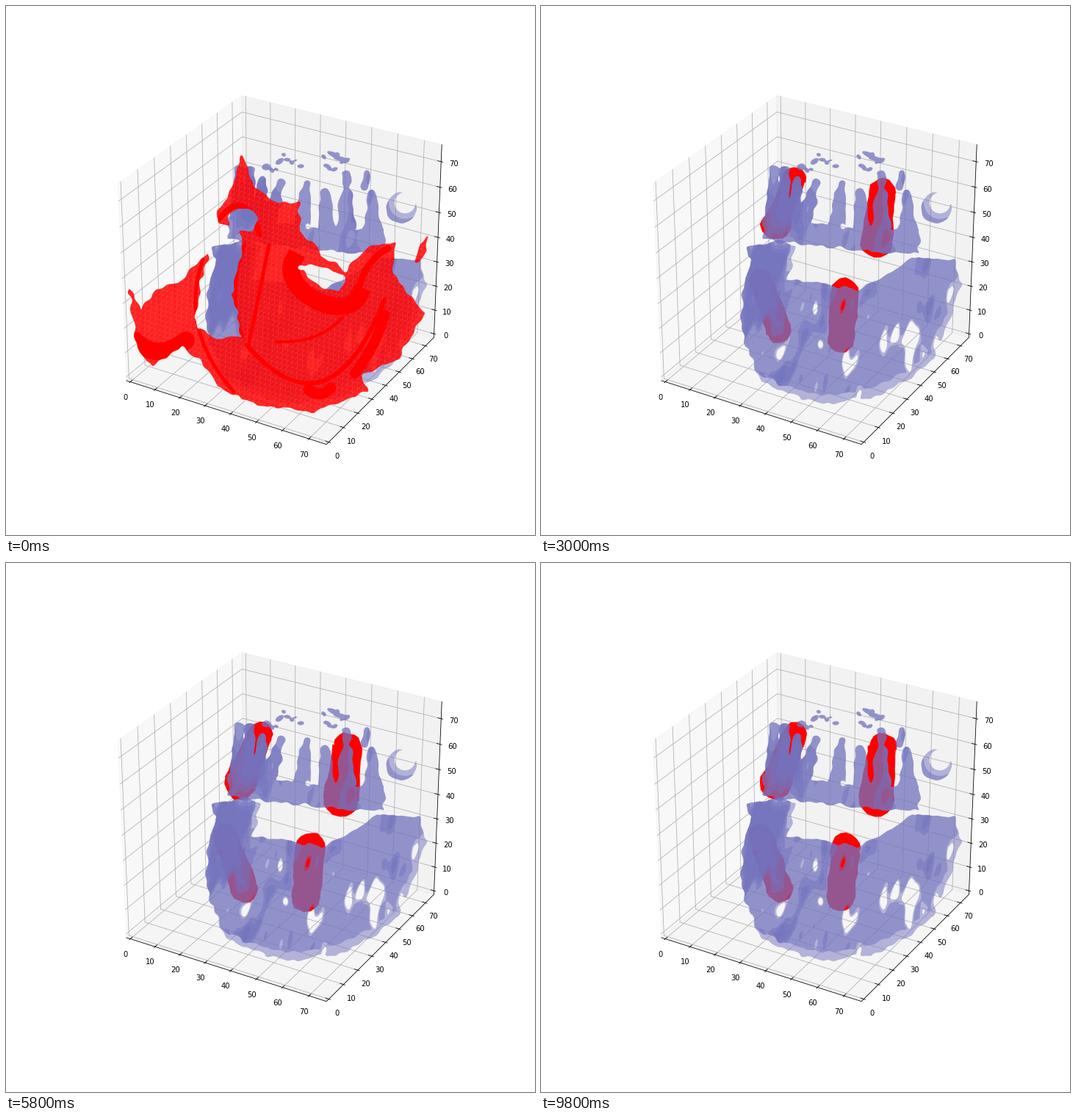
A matplotlib script that plays this animation: 720 px wide and 720 px high, repeating every 10 s.

```python
import numpy as np
import matplotlib.pyplot as plt
from matplotlib.animation import FuncAnimation
from matplotlib.collections import LineCollection
from matplotlib.patches import PathPatch
from matplotlib.path import Path

SIZE, TOP, FRAMES = 720, 75, 50
BLUE, RED = (0.45, 0.45, 0.75), (1, 0, 0)
rng = np.random.default_rng(5)

fig = plt.figure(figsize=(10, 10), dpi=72, facecolor="white")
ax = fig.add_axes([0, 0, 1, 1])
ax.set(xlim=(0, SIZE), ylim=(SIZE, 0))
ax.axis("off")


# ---- 3D box ----
def project(p):
    """Perspective view (elev 30, azim -60) of points in the unit cube."""
    p = np.atleast_2d(p) - 0.5
    h = np.sqrt(3) / 2
    depth = 10 - p @ [h / 2, -0.75, 0.5]
    u = p @ [h, 0.5, 0] / depth
    v = p @ [-0.25, h / 2, h] / depth
    return np.c_[90 + (u + 0.095) / 0.185 * 558,
                 630 - (v + 0.095) / 0.185 * 543.6]


LO, HI, PAD = -1 / 48, 49 / 48, 0.0418


def line(color, z, *points):
    ax.plot(*project(points).T, color=color, lw=0.8, zorder=z,
            solid_capstyle="projecting")


def pane(grey, *points):
    ax.fill(*project(points).T, color=(grey,) * 3, alpha=0.5, lw=1, zorder=0)


pane(0.95, (LO, LO, LO), (LO, HI, LO), (LO, HI, HI), (LO, LO, HI))
pane(0.90, (LO, HI, LO), (HI, HI, LO), (HI, HI, HI), (LO, HI, HI))
pane(0.925, (LO, LO, LO), (HI, LO, LO), (HI, HI, LO), (LO, HI, LO))
line("black", 1.5, (LO, LO, LO), (HI, LO, LO), (HI, HI, LO), (HI, HI, HI))

for value in range(0, TOP, 10):
    t = value / TOP
    line("#b0b0b0", 1, (t, LO, LO), (t, HI, LO), (t, HI, HI))
    line("#b0b0b0", 1, (HI, t, LO), (LO, t, LO), (LO, t, HI))
    line("#b0b0b0", 1, (LO, LO, t), (LO, HI, t), (HI, HI, t))
    out, inn = 0.1 / 12, 0.2 / 12
    line("black", 1.6, (t, LO - out, LO), (t, LO + inn, LO))
    line("black", 1.6, (HI + out, t, LO), (HI - inn, t, LO))
    line("black", 1.6, (HI + out, HI, t), (HI - inn, HI, t))
    for p in ((t, LO - PAD, LO - PAD), (HI + PAD, t, LO - PAD),
              (HI + PAD, HI + PAD, t)):
        x, y = project(p)[0]
        ax.text(x, y, str(value), ha="center", va="top", size=10, zorder=1.6)

# ---- scalar fields over the stage, positive inside a shape ----
X, Y = np.meshgrid(np.arange(150, 602, 2.0), np.arange(180, 572, 2.0))


def polygon(*points, dx=0, dy=0):
    """Signed distance to a polygon's edge."""
    p = np.array(points, float) + (dx, dy)
    best = np.full(X.shape, 1e9)
    for (ax_, ay), (bx, by) in zip(p, np.roll(p, -1, axis=0)):
        ux, uy = bx - ax_, by - ay
        t = np.clip(((X - ax_) * ux + (Y - ay) * uy) / (ux * ux + uy * uy), 0, 1)
        best = np.minimum(best, np.hypot(X - ax_ - t * ux, Y - ay - t * uy))
    inside = Path(p).contains_points(np.c_[X.ravel(), Y.ravel()])
    return np.where(inside.reshape(X.shape), best, -best)


def cone(x0, y0, r0, x1, y1, r1):
    ux, uy = x1 - x0, y1 - y0
    t = np.clip(((X - x0) * ux + (Y - y0) * uy) / (ux * ux + uy * uy), 0, 1)
    return r0 + (r1 - r0) * t - np.hypot(X - x0 - t * ux, Y - y0 - t * uy)


def ellipse(x, y, rx, ry, slope=0):
    return (1 - np.hypot((X - x) / rx, (Y - y - slope * (X - x)) / ry)) * ry


def bump(x, y, rx, ry, height):
    return height * np.exp(-((X - x) / rx) ** 2 - ((Y - y) / ry) ** 2)


def noise(across, along, lean=0.0):
    """Sum of random waves, unit spread; long axis tilted by lean."""
    c, s = np.cos(lean), np.sin(lean)
    u, v = (X * c + Y * s) / across, (Y * c - X * s) / along
    waves = rng.normal(0, 1, (40, 2))
    phase = rng.uniform(0, 2 * np.pi, 40)
    return sum(np.cos(a * u + b * v + f)
               for (a, b), f in zip(waves, phase)) / np.sqrt(20)


def outline(field, level=0.0):
    cs = ax.contourf(X, Y, field, [level, 1e6])
    path = cs.get_paths()[0]
    cs.remove()
    return path


def blob(path, color, alpha, z):
    return ax.add_patch(PathPatch(path, fc=color, alpha=alpha, lw=0, zorder=z))


def bone(shape, density, inner=None):
    """Stack of half-clear skins; negative density leaves a hole."""
    for i, level in enumerate((0, 0.3, 2.0, 2.5, 3.0)):
        body = shape if i == 0 or inner is None else np.minimum(shape, inner)
        blob(outline(np.minimum(body, 8 * (density - level))), BLUE, 0.5, 3)


# ---- lower jaw: dense pillar left, thin roots and gaps inside ----
rim = ((335, 372), (388, 379), (430, 386), (478, 362), (505, 342), (562, 347),
       (571, 378), (555, 430), (535, 480), (505, 507), (450, 533), (385, 540),
       (330, 526), (300, 511), (284, 478), (272, 430), (278, 370), (286, 345),
       (278, 328), (320, 320), (347, 326), (340, 350))
edge = 1.3 * noise(5, 5)
streaks = 0.62 * noise(5, 18, 0.3)
jaw = 1.45 + streaks * np.where(Y > 385, 1, 0.75)
for spot in ((308, 350, 30, 32, 2.4), (300, 392, 20, 32, 2.0),
             (283, 430, 10, 40, 0.9), (515, 382, 34, 34, 0.6),
             (355, 505, 48, 16, 0.7), (492, 463, 50, 30, -1.9),
             (420, 485, 17, 22, -2.3), (312, 465, 26, 28, -1.6),
             (374, 415, 6, 14, -2.0), (381, 460, 6, 10, -2.2),
             (560, 395, 13, 45, -1.2)):
    jaw = jaw + bump(*spot)
bone(polygon(*rim) + edge, jaw, polygon(*rim, dx=-4, dy=-10) + edge)

# ---- upper jaw: tapering roots above a gum band ----
roots = ((316, 222, 318), (333, 224, 325), (350, 238, 336), (374, 242, 350),
         (410, 242, 400), (434, 252, 437), (463, 229, 462), (498, 254, 500))
gum = np.minimum(335, 318 + 0.12 * (X - 310))
upper = np.minimum.reduce([gum - Y, Y - gum + 30, X - 302, 513 - X])
for tip_x, tip_y, base_x in roots:
    base_y = min(335, 318 + 0.12 * (base_x - 310)) - 15
    upper = np.maximum(upper, cone(tip_x, tip_y, 5, base_x, base_y, 15))
upper = np.maximum(upper, cone(492, 226, 2, 488, 246, 5))
teeth_skin = (1.45 + 0.42 * noise(6, 18, 0.2) + bump(335, 270, 28, 44, 2.6)
              + bump(463, 285, 12, 40, 0.5) + bump(411, 300, 4, 5, -2.5))
bone(upper + edge, teeth_skin)

# loose specks and the ball
specks = np.full(X.shape, -9.0)
for cx, spread in ((378, 22), (447, 15)):
    for x, y in zip(np.linspace(cx - spread, cx + spread, 9),
                    rng.uniform(201, 224, 9)):
        w, h = rng.uniform(3, 7), rng.uniform(2, 4)
        specks = np.maximum(specks, ellipse(x, y, w, h, rng.uniform(-0.5, 0.6)))
bone(specks + 0.4 * edge, np.ones(X.shape))
bone(ellipse(538, 275, 20.5, 21.5) + 0.5 * edge,
     0.15 + 0.04 * (np.hypot(X - 543, Y - 268) - 18))

# ---- first red surface ----
shell = np.maximum.reduce([
    polygon((168, 384), (184, 413), (204, 385), (234, 377), (278, 331),
            (266, 378), (258, 425), (275, 492), (240, 464), (200, 489),
            (177, 465)),
    polygon((326, 318), (400, 305), (437, 347), (462, 359), (497, 326),
            (529, 324), (526, 365), (570, 418), (535, 481), (487, 502),
            (491, 524), (420, 552), (330, 541), (288, 518), (255, 465),
            (262, 437), (284, 452), (320, 450), (308, 395)),
    polygon((321, 204), (336, 245), (372, 270), (398, 267), (402, 318),
            (330, 326), (306, 299), (288, 296), (288, 278), (302, 262)),
    polygon((574, 314), (574, 333), (557, 349), (562, 322)),
])
for hole in (ellipse(434, 370, 29, 13, 0.3), ellipse(322, 291, 21, 15)):
    shell = np.minimum(shell, -hole)
shell = shell + edge
shell_paths = [outline(shell, 9.5 * k) for k in range(7)]
red_shell = blob(shell_paths[0], RED, 0.87, 4)

facets = []
for c in np.arange(-400, 1300, 7):
    facets += [[(140, c), (600, c + 147)], [(140, c), (600, c - 460)],
               [(c, 180), (c - 20, 570)]]
shell_parts = [ax.add_collection(LineCollection(
    facets, colors=[(1, 0.6, 0.6, 0.25)], lw=0.5, zorder=4.1))]


def fold(a, b, c, width):
    """Opaque crease along a quadratic curve."""
    t = np.linspace(0, 1, 30)[:, None]
    p = (1 - t) ** 2 * a + 2 * t * (1 - t) * b + t ** 2 * c
    shell_parts.extend(ax.plot(*p.T, color=RED, lw=width, zorder=4.2,
                               solid_capstyle="round"))


for *pts, width in (
    (358, 325, 345, 390, 330, 462, 5), (328, 462, 440, 590, 515, 400, 6),
    (368, 457, 425, 460, 458, 424, 4), (325, 325, 300, 390, 322, 450, 5),
    (268, 345, 235, 440, 310, 525, 5), (175, 455, 205, 485, 245, 455, 24),
    (412, 522, 428, 535, 442, 520, 15), (520, 330, 490, 345, 480, 385, 9),
    (515, 420, 505, 460, 475, 500, 14), (290, 290, 325, 245, 345, 310, 8),
):
    fold(*np.array(pts, float).reshape(3, 2), width)
sweep = np.radians(np.linspace(15, 200, 40))
shell_parts += ax.plot(435 + 47 * np.cos(sweep),
                       372 + 34 * np.sin(sweep) + 14 * np.cos(sweep),
                       color=RED, lw=24, zorder=4.2)

# ---- red teeth: two end circles each, upper ones pinched while thin ----
TEETH = ((346, 232, 17, 319, 300, 23, 0.4), (465, 250, 20, 456, 322, 25, 0.15),
         (298, 370, 17, 325, 444, 19, 0.0), (414, 387, 21, 408, 456, 20, 0.0))
red_teeth = [blob(shell_paths[0], RED, 1, 4.3) for _ in TEETH]


def tooth(x0, y0, r0, x1, y1, r1, pinch, full, scale, wobble):
    a, b = np.array([x0, y0]), np.array([x1, y1])
    mid = (a + b) / 2
    a, b = (mid + (p - mid) * (0.86 + 0.14 * full) * scale for p in (a, b))
    u = (b - a) / np.hypot(*(b - a))
    n = np.array([-u[1], u[0]])
    t = np.linspace(0, 1, 9)[:, None]
    size = (0.8 + 0.2 * full) * scale
    r = (r0 + (r1 - r0) * t) * size * (1 - pinch * (1 - full) * np.sin(np.pi * t))
    c, s = np.cos(np.pi * t), np.sin(np.pi * t)
    axis = a + t * (b - a)
    p = np.vstack([axis + r * n, b + r[-1] * (c * n + s * u),
                   (axis - r * n)[::-1], a - r[0] * (c * n + s * u)])
    p = p + wobble.normal(0, 0.7, p.shape)
    return Path(np.vstack([p, p[:1]]), closed=True)


def update(k):
    eroding = k < len(shell_paths)
    red_shell.set_visible(eroding)
    if eroding:
        red_shell.set_path(shell_paths[k])
    for part in shell_parts:
        part.set_visible(eroding)
        part.set_clip_path(red_shell)

    pose = k - 1 if k in (8, 12) else k  # the surface rests at these steps
    swing = np.cos(2 * np.pi * (k - 16) / 16.5)
    settle = 1 - np.exp(-max(pose - 7, 0) / 8)
    full = settle * (1 - 0.16 * max(swing, 0))
    scale = min(1, 0.3 + 0.1 * k)
    behind = k > 8 and swing > 0.2
    wobble = np.random.default_rng(pose)
    for patch, shape in zip(red_teeth, TEETH):
        patch.set_path(tooth(*shape, full, scale, wobble))
        patch.set_visible(k > 0)
        patch.set_zorder(2 if behind else 4.3)
    return [red_shell, *shell_parts, *red_teeth]


anim = FuncAnimation(fig, update, frames=FRAMES, interval=200, repeat=True,
                     repeat_delay=0, blit=False)
plt.show()
```
